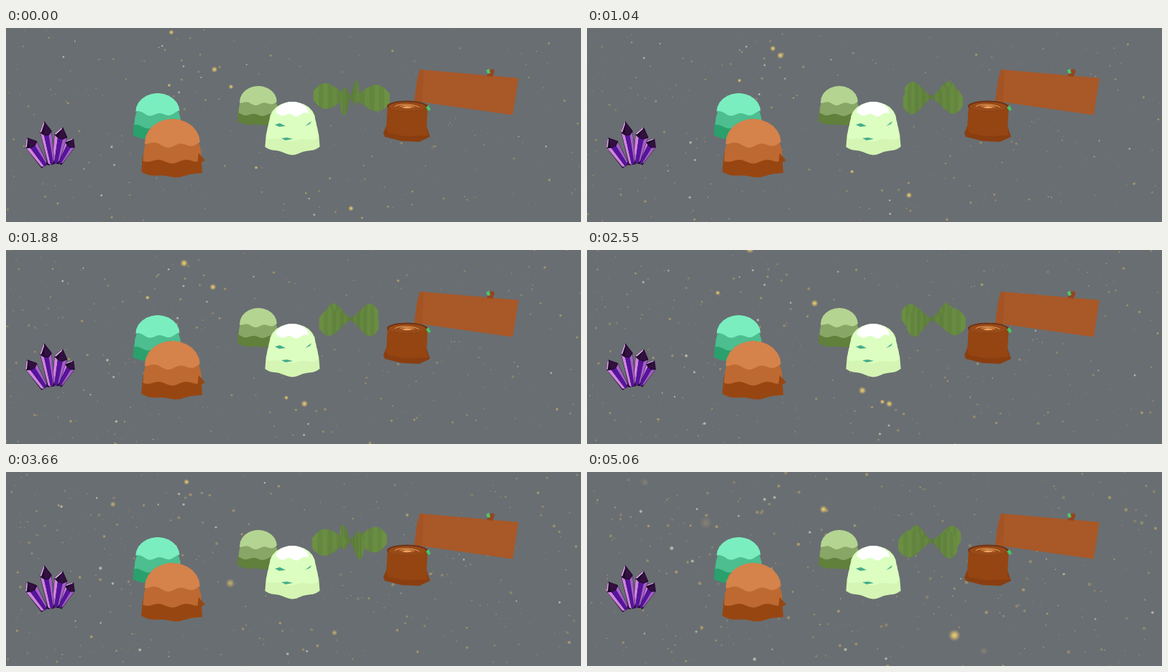
These frames come from a looping animation (800 px wide and 271 px high, 5.16 s). An HTML page with a canvas:

```html
<!DOCTYPE html>
<html lang="en">
<head>
<meta charset="utf-8">
<title>Forest pieces among drifting sparks</title>
<style>
html, body { margin: 0; width: 100%; height: 100%; overflow: hidden; background: #696e72; }
canvas { display: block; }
</style>
</head>
<body>
<canvas id="stage" width="800" height="271"></canvas>
<script>
const ctx = document.getElementById('stage').getContext('2d');
const LOOP = 5160, LAST = 5060, REACH = 9000;
const { PI, sin, cos, sqrt } = Math;

let seed = 20;
function rand() {
  seed = (seed * 1664525 + 1013904223) % 4294967296;
  return seed / 4294967296;
}

function poly(color, ...points) {
  ctx.fillStyle = color;
  ctx.beginPath();
  points.forEach(p => ctx.lineTo(...p));
  ctx.closePath();
  ctx.fill();
}

function oval(color, x, y, rx, ry = rx) {
  ctx.fillStyle = color;
  ctx.beginPath();
  ctx.ellipse(x, y, rx, ry, 0, 0, 2 * PI);
  ctx.fill();
}

// Sparks come nearer at constant speed, so they spread and grow faster and faster.
const dust = Array.from({ length: 560 }, () => {
  const angle = rand() * 2 * PI, speed = 15 + 75 * rand();
  return {
    x: -60 + 920 * rand() ** 1.3, y: -30 + 330 * rand(),
    dx: speed * cos(angle), dy: speed * sin(angle) * 0.7,
    r: 0.45 + 1.2 * rand() ** 3, alpha: 0.25 + 0.45 * rand()
  };
});
const glows = [
  { x: 480, y: 252, dx: -245, dy: -141, r: 4, fades: true },
  { x: 227, y: 80, dx: -114, dy: -51, r: 2.6, fades: true },
  { x: 348, y: 195, dx: 159, dy: 43, r: 2.6, fades: true },
  { x: 290, y: 58, dx: -160, dy: -150, r: 4.5 },
  { x: 162, y: -30, dx: 130, dy: 64, r: 2.5 },
  { x: 313, y: 82, dx: 272, dy: 336, r: 3.6 },
  { x: 230, y: 6, dx: 219, dy: 173, r: 3.8 }
];

function drawSparks(t) {
  const near = t / (REACH - t), grow = 1 + near;
  for (const s of dust) {
    ctx.globalAlpha = s.alpha;
    oval(s.alpha > 0.66 ? '#d3cfbd' : '#c6ad68', s.x + s.dx * near, s.y + s.dy * near, s.r * sqrt(grow));
  }
  for (const s of glows) {
    const x = s.x + s.dx * near, y = s.y + s.dy * near, r = s.r * grow;
    const light = ctx.createRadialGradient(x, y, 0, x, y, r);
    light.addColorStop(0, '#eed27c');
    light.addColorStop(0.4, '#d6bb6dd0');
    light.addColorStop(1, '#b9a36a00');
    ctx.globalAlpha = s.fades ? Math.min(1, Math.max(0.2, 1 - (t - 2900) / 2300)) : 1;
    oval(light, x, y, r);
  }
  ctx.globalAlpha = 1;
}

// Four upright leaves crossed on a vertical axis, seen slightly from above.
function drawLeaves(t) {
  const STRIPS = 8, base = (13 + t * 0.1146) * PI / 180;
  const leaves = [0, 1, 2, 3].map(i => base + i * PI / 2).sort((a, b) => sin(a) - sin(b));
  for (const a of leaves) {
    const edge = u => {
      const z = 54 * u * sin(a), scale = 1 + z * 0.002;
      const half = (1 + 17 * sin(2.8 * u ** 1.5)) * scale;
      const x = 479.5 + 54 * u * cos(a) * scale, y = 96.5 + z * 0.17;
      return [[x, y - half], [x, y + half]];
    };
    for (let i = 0; i < STRIPS; i++) {
      const [top, low] = edge(i / STRIPS), [top2, low2] = edge((i + 1) / STRIPS);
      const light = 34 + 3 * Math.abs(cos(a)) + (i % 2 ? 2 : 0) + i * 0.4;
      const color = `hsl(89 36% ${light}%)`;
      poly(color, top, top2, low2, low);
      ctx.strokeStyle = color;
      ctx.stroke();
    }
  }
}

// One bell with a wavy hem; bushes are bells stacked from the lowest to the cap.
function bell(color, x, top, hem, half, wave, bow) {
  const points = [];
  for (let i = 0; i <= 12; i++) {
    const a = PI * i / 12;
    points.push([x - half * cos(a), hem - (hem - top) * sin(a)]);
  }
  for (let i = 0; i <= 16; i++) {
    const s = 1 - i / 8;
    points.push([x + half * s, hem + bow * (1 - s * s) + wave * sin(s * 7 + hem)]);
  }
  poly(color, ...points);
}

function bush(x, top, size, cap, middle, foot) {
  bell(foot, x - size * 0.02, top, top + size * 1.86, size * 1.06, size * 0.03, size * 0.16);
  bell(middle, x, top, top + size * 1.42, size * 1.02, size * 0.06, size * 0.08);
  bell(cap, x, top, top + size * 0.82, size * 0.96, size * 0.07, size * 0.12);
}

function drawSnowyTree() {
  for (let i = 3; i >= 0; i--) {
    bell(i === 3 ? '#d4f5b3' : '#dcfec0', 398.5, 103, 129 + i * 12, 32 + i * 2, 1.5, i === 3 ? 11 : 4);
  }
  bell('#ffffff', 398, 103, 119, 23, 2, 3);
  poly('#43ad88', [374, 135], [381, 133], [389, 137], [380, 138]);
  poly('#43ad88', [383, 154], [391, 153], [399, 155], [389, 157]);
  poly('#43ad88', [416, 137], [425, 130], [423, 134]);
}

function drawLog() {
  poly('#a95827', [576, 58], [713, 70], [705, 121.5], [568, 102], [572, 72]);
  poly('#a45424', [576, 58], [581, 59], [579, 103.5], [568, 102], [572, 72]);
  poly('#94451f', [669, 67], [671, 60], [677, 57], [680, 60], [677, 68]);
  poly('#4fc769', [668, 59], [672, 57], [674, 63], [670, 64]);
}

function drawStump() {
  poly('#8a3e10', [529, 137], [525, 147], [527, 152], [551, 158], [575, 159], [590, 152], [585, 137]);
  poly('#954512', [531, 107], [529, 140], [532, 147], [556, 151], [587, 150], [585, 140], [587, 107]);
  oval('#6f3314', 558, 109, 28, 7.5);
  oval('#984a18', 558, 110, 26, 6.5);
  ctx.strokeStyle = '#eda461';
  for (const r of [17, 10, 4]) {
    ctx.beginPath();
    ctx.ellipse(558, 111, r, r * 0.24, 0.05, PI, 1.9 * PI + 2 / r);
    ctx.stroke();
  }
  oval('#eda461', 558, 111, 7, 1.2);
  poly('#41c768', [584, 111], [588, 108], [591, 114], [588, 116]);
}

// A crystal in its own frame: x across from -1 to 1, y from base (0) to tip (1).
function crystal(tipX, tipY, baseX, baseY, half) {
  const dx = tipX - baseX, dy = tipY - baseY;
  ctx.save();
  ctx.translate(baseX, baseY);
  ctx.rotate(Math.atan2(dx, -dy));
  ctx.scale(half, -Math.hypot(dx, dy));
  poly('#1d0a2c', [-0.6, 0], [-1, 0.78], [0, 1], [1, 0.76], [0.6, 0]);
  poly('#d084de', [-0.5, 0.04], [-0.95, 0.74], [-0.4, 0.68], [-0.1, 0]);
  poly('#55149c', [-0.1, 0], [-0.4, 0.68], [0.4, 0.66], [0.4, 0.02]);
  poly('#a55fc6', [0.4, 0.04], [0.4, 0.66], [0.95, 0.73], [0.6, 0.1]);
  poly('#33103f', [-0.4, 0.7], [0, 0.96], [0.9, 0.76], [0.4, 0.68]);
  poly('#e6aeee', [-1, 0.77], [0, 1], [-0.1, 0.93], [-0.8, 0.76]);
  ctx.restore();
}

function frame() {
  const t = Math.min(performance.now() % LOOP, LAST);
  ctx.fillStyle = '#696e72';
  ctx.fillRect(0, 0, 800, 271);
  ctx.lineWidth = 1;
  drawSparks(t);
  drawLog();
  drawLeaves(t);
  bush(211, 91, 32, '#7beec0', '#4cbe8f', '#2aa06d');
  bush(231.5, 127, 40, '#d5824b', '#bd6931', '#984611');
  poly('#984611', [268, 175], [277, 185], [266, 191]);
  bush(351, 81, 27, '#b4d591', '#88a666', '#60803b');
  drawSnowyTree();
  drawStump();
  crystal(94, 154, 73, 189, 8);
  crystal(79, 138, 68, 189, 9);
  crystal(29, 153, 54, 193, 9);
  crystal(53, 130, 63, 191, 8);
  requestAnimationFrame(frame);
}
frame();
</script>
</body>
</html>
```
